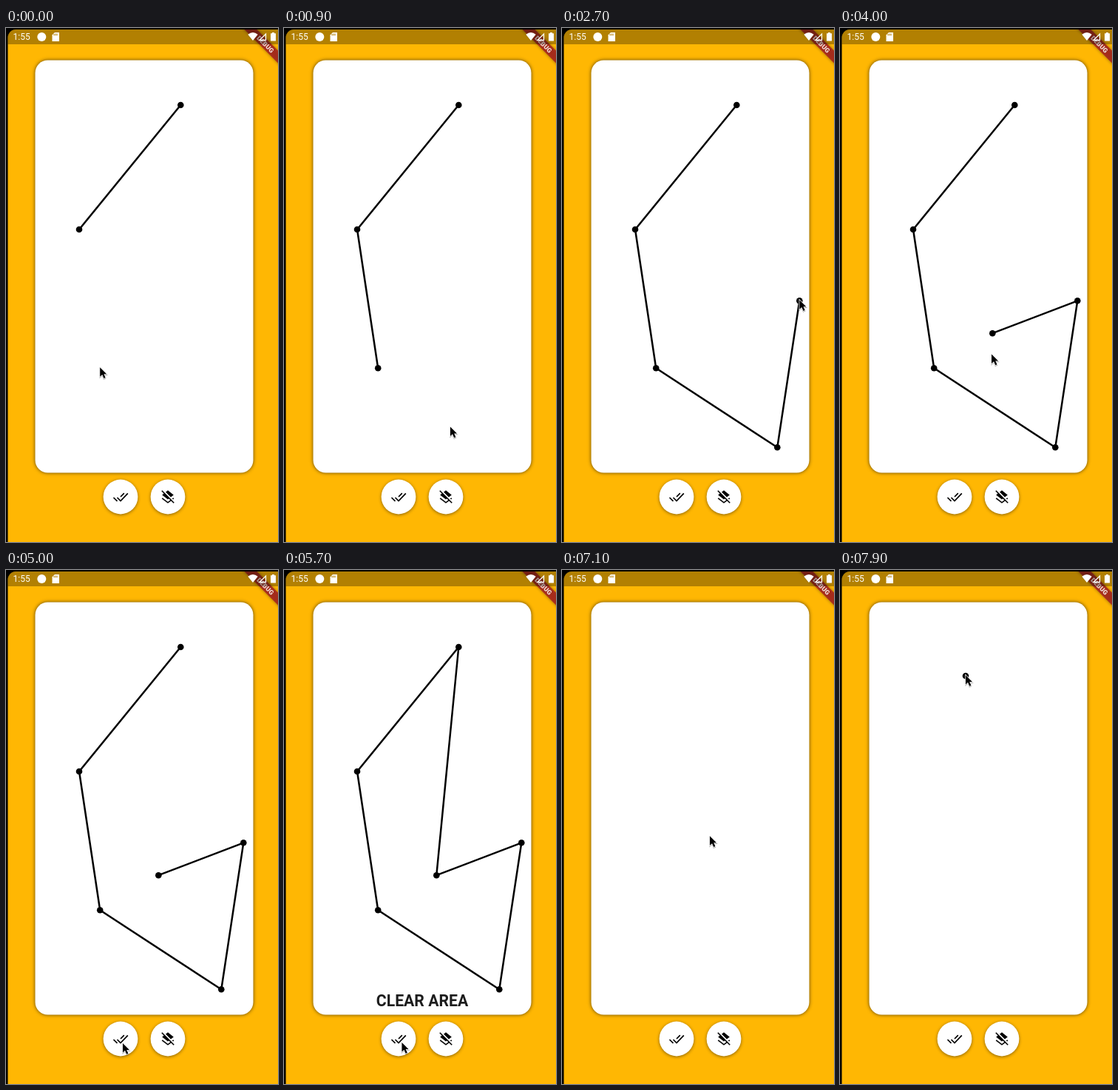
These frames come from a looping animation (368x694 px, 8 s). An HTML page:

```html
<!DOCTYPE html>
<html lang="en">
<head>
<meta charset="utf-8">
<style>
  html, body { margin: 0; width: 100%; height: 100%; overflow: hidden; background: #000; }
  svg { display: block; width: 368px; height: 694px; font-family: Roboto, sans-serif; }
  .card { filter: drop-shadow(0 .5px 2.5px #000a); }
  .button { filter: drop-shadow(0 1.5px 2px #0007); }
</style>
</head>
<body>
<svg viewBox="0 0 368 694">
  <clipPath id="screen"><rect x="2.5" y="2" width="390" height="720" rx="11"/></clipPath>
  <g clip-path="url(#screen)">
    <rect width="368" height="694" fill="#ffb703"/>
    <rect class="card" x="39.5" y="43.5" width="295" height="557" rx="17" fill="#fff"/>
    <g class="button" fill="#fff">
      <circle cx="155" cy="633" r="23.4"/>
      <circle cx="219" cy="633" r="23.4"/>
    </g>
    <!-- double check -->
    <path d="M145.5 634l5 4.8M150.5 634l4.5 4.6 9.8-10.2M155 633l4.8-4.8" fill="none" stroke="#000" stroke-width="1.7"/>
    <!-- crossed-out layers -->
    <g transform="translate(219 633)">
      <path d="M-7.8-2.5L0-8.7 7.8-2.5 0 3.6z"/>
      <path d="M-7.8 1.8L0 7.8 7.8 1.8" fill="none" stroke="#000" stroke-width="1.7"/>
      <path d="M-7-9L9.2 7.2" stroke="#fff" stroke-width="2"/>
      <path d="M-8.2-8.2L8.2 8.2" stroke="#000" stroke-width="1.6"/>
    </g>
    <g transform="translate(351 22) rotate(45)">
      <rect x="-50" y="-6" width="100" height="12" fill="#a52020" fill-opacity=".85" style="filter:drop-shadow(0 0 2px #0007)"/>
      <text y="3.1" font-size="8.8" font-weight="800" text-anchor="middle" fill="#fff" fill-opacity=".85">DEBUG</text>
    </g>
    <rect width="368" height="22" fill="#000" fill-opacity=".3"/>
    <g fill="#fff">
      <text x="9.5" y="16.4" font-size="12">1:55</text>
      <circle cx="48.3" cy="12" r="6"/>
      <path d="M66 6h6v12h-9.500V9.600z"/>
      <path d="M327.300 8.700q6.700-5.400 13.400 0L334 17z"/>
      <path d="M351.500 8v8.500H343z" fill="none" stroke="#fff" stroke-width="1.300"/>
      <path d="M360 6h3v1.300h2v10.200h-7V7.300h2z"/>
    </g>
    <path d="M65 8v2.300M67 7.500v2.800M69 7.500v2.800" stroke="#b38002"/>
    <path id="shape" fill="none" stroke="#000" stroke-width="2.5" stroke-linejoin="round"/>
    <g id="dots"></g>
    <text id="label" x="187" y="589" font-size="21.2" font-weight="700" text-anchor="middle" fill="#1d1d1d">CLEAR AREA</text>
    <path id="cursor" d="M0 0V12.500L3 9.800 5.200 14.700 7.400 13.700 5.200 9H9z" stroke="#fff" stroke-width="1.400" paint-order="stroke" style="filter:drop-shadow(.5px 1px .7px #0005)"/>
  </g>
</svg>
<script>
const LOOP = 8000, STEP = 100;
const el = id => document.getElementById(id);
const tap = (leave, arrive, press, x, y, action = 'add') => ({ leave, arrive, press, x, y, action });

// The pointer travels from tap to tap; each press acts on the polygon.
const taps = [
  tap(-3, -3, -3, 236.3, 104),
  tap(-2, -2, -2, 99, 272),
  tap(-1, -1, 200, 127.2, 459.3),
  tap(600, 1200, 1400, 291.3, 566.3),
  tap(1700, 2600, 2700, 321.3, 368.3),
  tap(2900, 3400, 3600, 206.3, 412.2),
  tap(3950, 4700, 5100, 158, 640, 'close'),
  tap(5650, 6400, 6700, 216, 632, 'clear'),
  tap(6900, 7500, 7800, 170, 143)
];

// Eases out, with the vertical part leading the horizontal one.
function pointer(t) {
  const i = taps.findLastIndex(k => t >= k.leave);
  const to = taps[i], from = taps[i - 1];
  const p = Math.min(1, (t - to.leave) / (to.arrive - to.leave));
  const e = 1 - (1 - p) ** 2;
  return [from.x + (to.x - from.x) * e ** 1.8, from.y + (to.y - from.y) * e - 1];
}

function polygon(t) {
  let dots = [], closed = false;
  for (const k of taps.filter(k => t >= k.press)) {
    if (k.action === 'add') dots.push(k);
    else closed = k.action === 'close';
    if (k.action === 'clear') dots = [];
  }
  return { dots, closed };
}

function draw(now) {
  const t = Math.floor(now % LOOP / STEP) * STEP;
  const { dots, closed } = polygon(t);
  const path = dots.map(d => d.x + ' ' + d.y).join('L');
  el('shape').setAttribute('d', path && 'M' + path + (closed ? 'Z' : ''));
  el('dots').innerHTML = dots.map(d => `<circle cx="${d.x}" cy="${d.y}" r="4.3"/>`).join('');
  el('label').style.display = closed ? '' : 'none';
  el('cursor').setAttribute('transform', `translate(${pointer(t)})`);
}

const start = performance.now();
function frame() {
  draw(performance.now() - start);
  requestAnimationFrame(frame);
}
frame();
</script>
</body>
</html>
```
